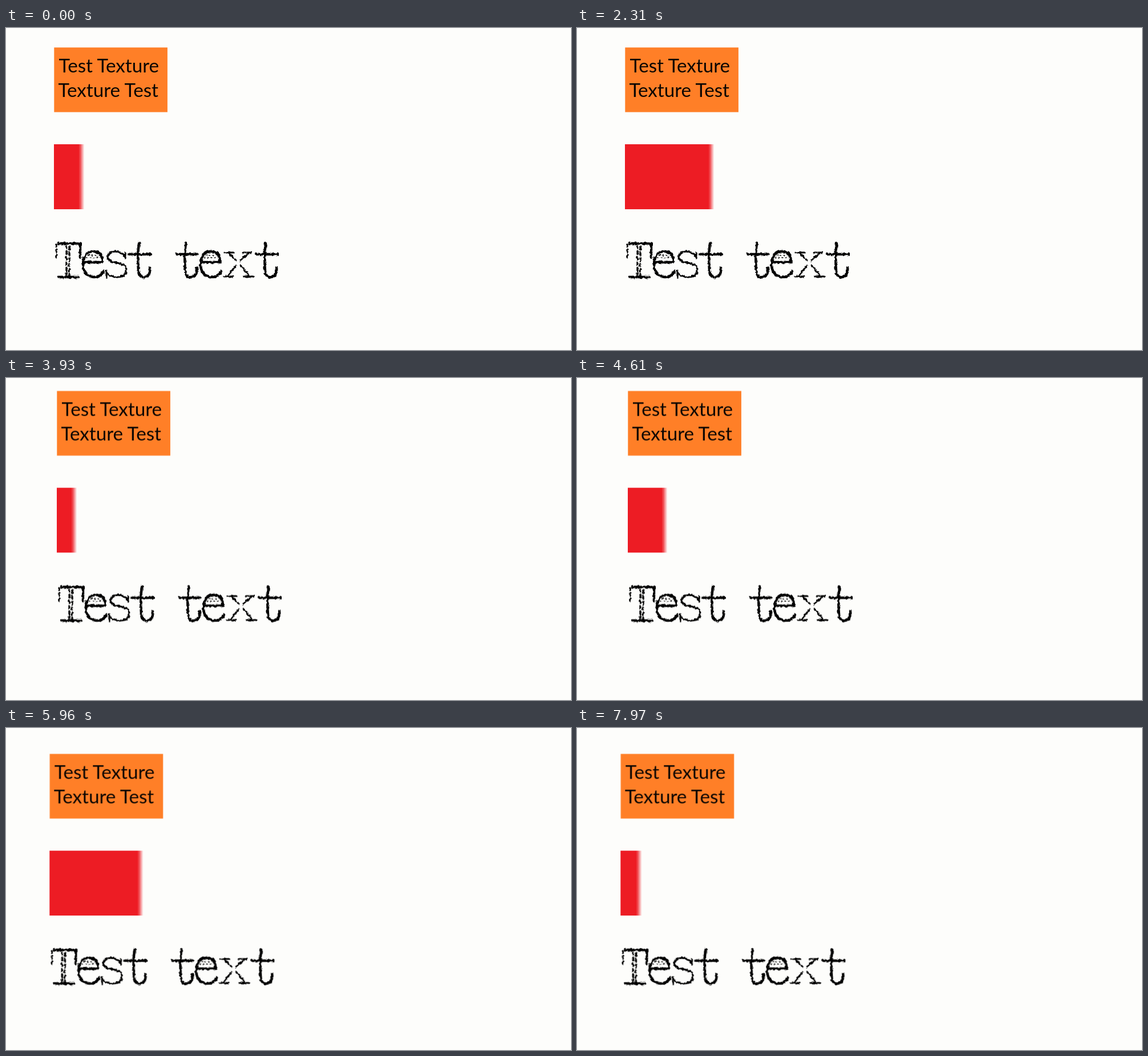
Recreate the animation shown at these times as an HTML page. Size 990 by 565 pixels, loop 7990 ms.

```html
<!DOCTYPE html>
<html lang="en">
<head>
<meta charset="utf-8">
<title>Test</title>
<style>
  html, body { margin: 0; width: 100%; height: 100%; overflow: hidden; background: #fdfdfb; }
  svg { display: block; width: 990px; height: 565px; }
  .caption { font: 33.2px Lato, "Open Sans", sans-serif; fill: #0a0603; }
  .typed { fill: none; stroke: #050505; stroke-width: 4.4; stroke-linecap: round; stroke-linejoin: round; }
  .thin { stroke-width: 3.2; }
  .worn { stroke-width: 3.4; stroke-dasharray: 5 4.6; }
  .faint { stroke-width: 1.3; stroke-dasharray: 2 4; }

  #scene { animation: hop 7990ms step-end infinite; }
  #fill { animation: fill 7990ms linear infinite; }

  @keyframes hop {
    0% { transform: translate(0, 0); }
    36.295% { transform: translate(5px, -11.4px); }
    71.59%, 100% { transform: translate(-7.7px, 11.3px); }
  }
  /* Fill width in px: grows, holds when full, then restarts. */
  @keyframes fill {
    0% { transform: translateX(48px); }
    9.762% { transform: translateX(79px); }
    20.526% { transform: translateX(117px); }
    28.911% { transform: translateX(151px); }
    41.802%, 43.303% { transform: translateX(204px); }
    43.304% { transform: translateX(6px); }
    51.69% { transform: translateX(40px); }
    57.697% { transform: translateX(64px); }
    67.459% { transform: translateX(119px); }
    82.728%, 93.241% { transform: translateX(204px); }
    93.242% { transform: translateX(5px); }
    99.75%, 100% { transform: translateX(32px); }
  }
</style>
</head>
<body>
<svg viewBox="0 0 990 565">
  <defs>
    <clipPath id="bar"><rect x="84.3" y="204.3" width="198.6" height="113.4"/></clipPath>
    <linearGradient id="edge">
      <stop offset="0" stop-color="#ed1c24"/>
      <stop offset="1" stop-color="#ed1c24" stop-opacity="0"/>
    </linearGradient>
    <filter id="rough" filterUnits="userSpaceOnUse" x="70" y="360" width="425" height="95">
      <feTurbulence type="fractalNoise" baseFrequency=".2" numOctaves="2" seed="4" result="noise"/>
      <feDisplacementMap in="SourceGraphic" in2="noise" scale="5" xChannelSelector="R" yChannelSelector="G"/>
    </filter>
    <g id="e">
      <path d="M137 411H169C169 398 163 392 153 392C142 392 135 401 135 414C135 429 143 437 154 437C162 437 168 433 171 427"/>
      <path class="faint" d="M141 403H166M144 399H163"/>
    </g>
    <g id="t">
      <path d="M216 397H254M233 377C231 392 231 412 232 426C233 436 238 438 243 437C250 436 253 430 252 420"/>
    </g>
  </defs>

  <g id="scene">
    <rect x="84.3" y="34.2" width="198.6" height="113.4" fill="#ff7f27"/>
    <g class="caption">
      <text x="92.6" y="78">Test Texture</text>
      <text x="91.4" y="121">Texture Test</text>
    </g>

    <g clip-path="url(#bar)">
      <g id="fill">
        <rect x="-170" y="204" width="250.5" height="114" fill="#ed1c24"/>
        <rect x="80.3" y="204" width="9" height="114" fill="url(#edge)"/>
      </g>
    </g>

    <g class="typed" filter="url(#rough)" role="img" aria-label="Test text">
      <path d="M92 378H129M130 379V403M92 437H127"/>
      <path class="worn" d="M88 403V380"/>
      <path class="worn" d="M106 382V435M111 384V435"/>
      <use href="#e"/>
      <path class="thin" d="M209 405V393M208 401C202 390 179 388 178 402C178 415 211 408 211 425C211 441 182 440 176 428M176 438V425"/>
      <use href="#t"/>
      <use href="#t" x="82"/>
      <use href="#e" x="206"/>
      <path class="thin" d="M383 394H400M415 394H430M382 436H398M416 436H433M391 395L403 408M411 417L426 434M425 395L411 408M403 417L389 434"/>
      <use href="#t" x="222"/>
    </g>
  </g>
</svg>
</body>
</html>
```
